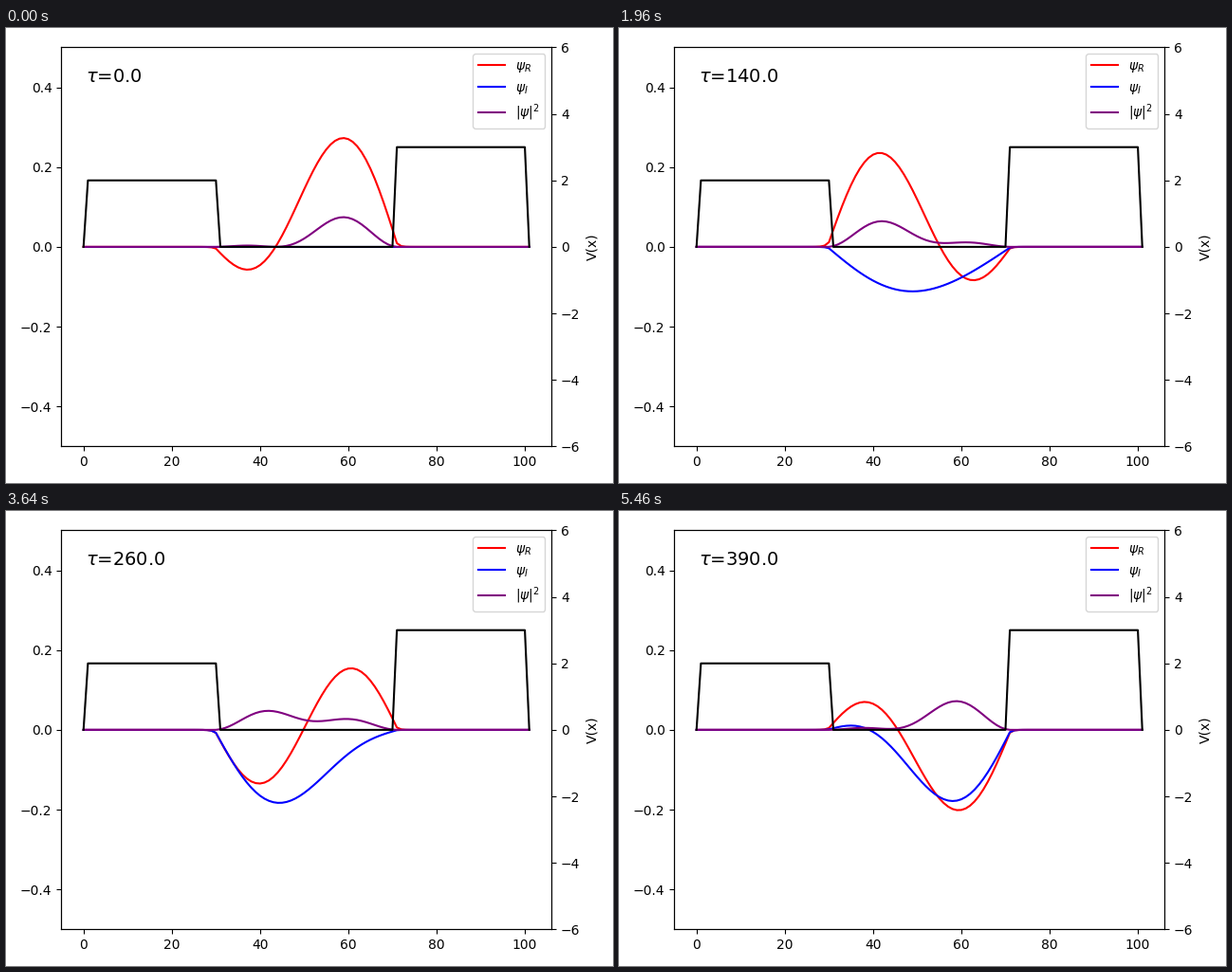
Write a matplotlib script that moves like this. It is 640 by 480 pixels and loops after 5.6 s.

```python
import numpy as np
import matplotlib.pyplot as plt
from matplotlib.animation import FuncAnimation

FRAMES, INTERVAL, TAU_STEP = 40, 140, 10.0

# Finite well with walls of unequal height
x = np.arange(102)
V = np.zeros(x.size)
V[1:31] = 2
V[71:101] = 3

# Discrete Hamiltonian -d2/dx2 + V and its two lowest states
hop = np.ones(x.size - 1)
H = np.diag(2 + V) - np.diag(hop, 1) - np.diag(hop, -1)
energies, states = np.linalg.eigh(H)
E, phi = energies[:2], states[:, :2]
phi = phi * np.sign(phi[60])  # both positive on the right: packet starts there


def psi(tau):
    return phi @ np.exp(-1j * E * tau) / np.sqrt(2)


plt.rcParams["font.family"] = "DejaVu Sans"
fig, ax = plt.subplots(figsize=(6.4, 4.8), dpi=100)
real, = ax.plot(x, 0 * x, color="red", label=r"$\psi_R$")
imag, = ax.plot(x, 0 * x, color="blue", label=r"$\psi_I$")
dens, = ax.plot(x, 0 * x, color="purple", label=r"$|\psi|^2$")
ax.set_ylim(-0.5, 0.5)
ax.legend(loc="upper right")
clock = ax.text(0.05, 0.95, "", transform=ax.transAxes, fontsize=14, va="top")

ax_v = ax.twinx()
ax_v.plot(x, V, color="black")
ax_v.set_ylim(-6, 6)
ax_v.set_ylabel("V(x)")
fig.tight_layout()


def update(i):
    tau = i * TAU_STEP
    wave = psi(tau)
    real.set_ydata(wave.real)
    imag.set_ydata(wave.imag)
    dens.set_ydata(np.abs(wave) ** 2)
    clock.set_text(rf"$\tau$={tau:.1f}")
    return real, imag, dens, clock


anim = FuncAnimation(fig, update, frames=FRAMES, interval=INTERVAL,
                     repeat=True, repeat_delay=0)
plt.show()
```
